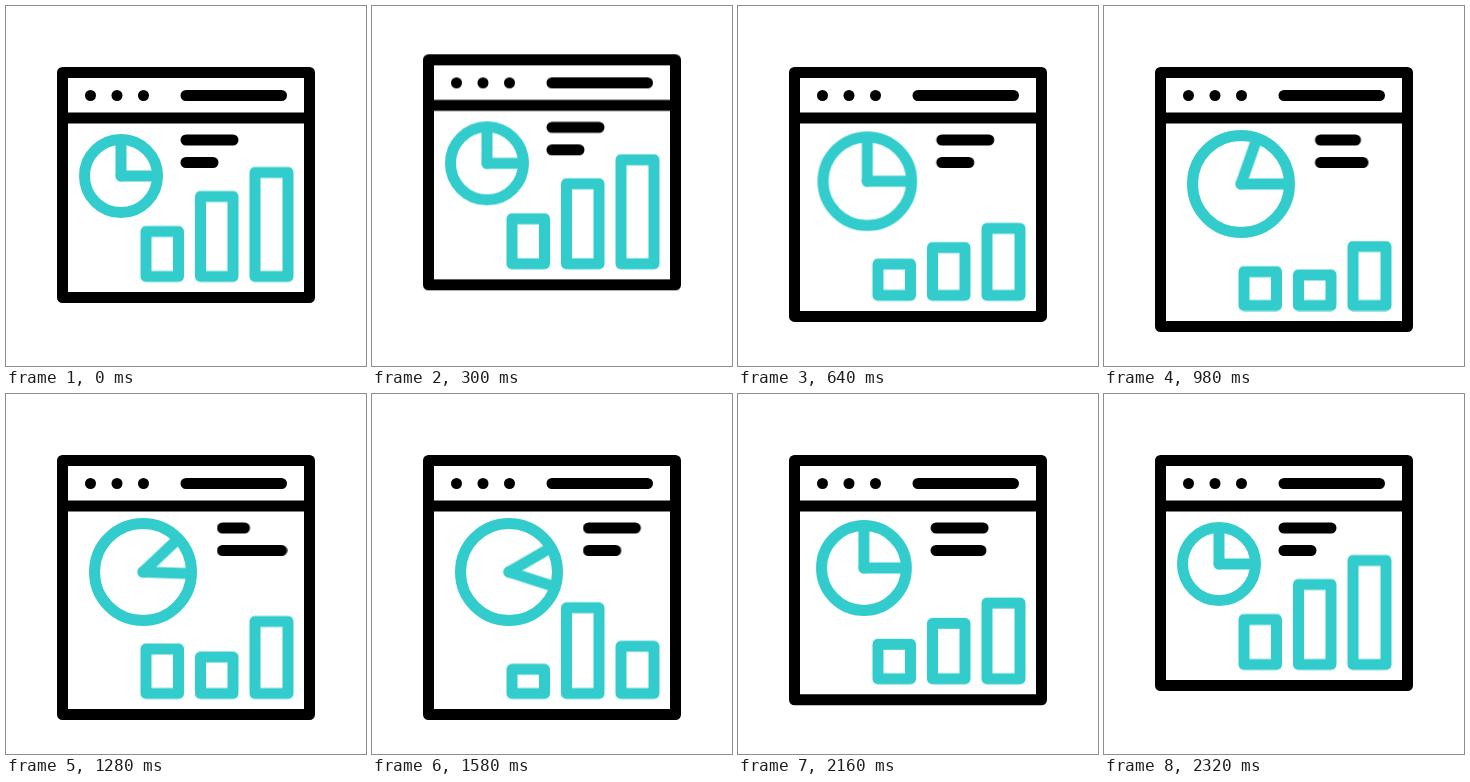
An HTML page without scripts that plays this animation: 360x360 px, repeating every 2.4 s.

```html
<!DOCTYPE html>
<html lang="en">
<head>
<meta charset="utf-8">
<title>Dashboard icon</title>
<style>
  html, body { margin: 0; width: 100%; height: 100%; overflow: hidden; background: #fff; }
  svg { display: block; width: 100vw; height: 100vh; }

  .ink { fill: #000; }
  .line { fill: none; stroke: #000; stroke-width: 11; stroke-linecap: round; stroke-linejoin: round; }
  .teal { fill: none; stroke: #3cc; stroke-width: 11; stroke-linejoin: round; }
  .hand { fill: #3cc; }

  .move { animation: 2400ms cubic-bezier(.33, 0, .67, 1) infinite; }

  /* 200 ms = 8.333%; the window is open from 33.333% to 83.333% */
  #window { animation-name: hop; }
  #frame  { height: 225px; animation-name: frame; }
  #bars   { animation-name: drop; }
  #text   { animation-name: slide; }
  #pie    { transform: translate(115px, 170px); animation-name: pie; }
  #ring   { r: 36.5px; animation-name: ring; }
  .hand   { width: 42px; animation-name: reach; }
  #from   { transform: rotate(-90deg); animation-name: from; }
  #to     { transform: rotate(0deg); animation-name: to; }
  #text1  { width: 58px; animation-name: text1; }
  #text2  { width: 38px; animation-name: text2; }
  #bar1   { height: 45px; animation-name: bar1; }
  #bar2   { height: 80px; animation-name: bar2; }
  #bar3   { height: 104px; animation-name: bar3; }

  @keyframes hop {
    0%, 8.333%, 25%, 100% { transform: translateY(0); }
    16.667% { transform: translateY(-25px); }
  }
  @keyframes frame {
    0%, 16.667%, 96.667%, 100% { height: 225px; }
    33.333%, 83.333% { height: 254px; }
  }
  @keyframes drop {
    0%, 16.667%, 96.667%, 100% { transform: translateY(0); }
    33.333%, 83.333% { transform: translateY(29px); }
  }
  @keyframes slide {
    0%, 16.667%, 96.667%, 100% { transform: translateX(0); }
    33.333%, 83.333% { transform: translateX(36.5px); }
  }
  @keyframes pie {
    0%, 16.667%, 96.667%, 100% { transform: translate(115px, 170px); }
    33.333%, 83.333% { transform: translate(137px, 178px); }
  }
  @keyframes ring {
    0%, 16.667%, 96.667%, 100% { r: 36.5px; }
    33.333%, 83.333% { r: 48.5px; }
  }
  @keyframes reach {
    0%, 16.667%, 96.667%, 100% { width: 42px; }
    33.333%, 83.333% { width: 54px; }
  }
  @keyframes from {
    0%, 33.333%, 83.333%, 100% { transform: rotate(-90deg); }
    50% { transform: rotate(-45deg); }
    66.667% { transform: rotate(-30deg); }
  }
  @keyframes to {
    0%, 50%, 83.333%, 100% { transform: rotate(0deg); }
    66.667% { transform: rotate(18deg); }
  }
  @keyframes text1 {
    0%, 33.333%, 66.667%, 100% { width: 58px; }
    50% { width: 30px; }
  }
  @keyframes text2 {
    0%, 33.333%, 66.667%, 96.667%, 100% { width: 38px; }
    50%, 83.333% { width: 74px; }
  }
  @keyframes bar1 {
    0%, 16.667%, 96.667%, 100% { height: 45px; }
    33.333%, 66.667%, 83.333% { height: 24px; }
    50% { height: 47px; }
  }
  @keyframes bar2 {
    0%, 16.667%, 96.667%, 100% { height: 80px; }
    33.333%, 50%, 83.333% { height: 30.5px; }
    66.667% { height: 86px; }
  }
  @keyframes bar3 {
    0%, 16.667%, 96.667%, 100% { height: 104px; }
    33.333%, 66.667%, 83.333% { height: 47px; }
    50% { height: 75px; }
  }
</style>
</head>
<body>
<svg viewBox="0 0 360 360">
  <g id="window" class="move">
    <rect id="frame" class="line move" x="56.5" y="66.5" width="247" height="225"/>
    <path class="line" d="M56.5 112H303.5M180 89.5H275.5"/>
    <g class="ink">
      <circle cx="84.5" cy="89.5" r="5.5"/>
      <circle cx="111" cy="89.5" r="5.5"/>
      <circle cx="137.5" cy="89.5" r="5.5"/>
    </g>

    <g id="text" class="ink move">
      <rect id="text1" class="move" x="174.5" y="128.5" width="58" height="11" rx="5.5"/>
      <rect id="text2" class="move" x="174.5" y="151" width="38" height="11" rx="5.5"/>
    </g>

    <g id="pie" class="move">
      <circle id="ring" class="teal move" r="36.5"/>
      <rect id="from" class="hand-turn move" width="0" height="0" visibility="hidden"/>
      <g id="from" class="move"><rect class="hand move" x="-5.5" y="-5.5" width="42" height="11" rx="5.5"/></g>
      <g id="to" class="move"><rect class="hand move" x="-5.5" y="-5.5" width="42" height="11" rx="5.5"/></g>
    </g>

    <g id="bars" class="move">
      <g class="teal" transform="translate(0 270.5) scale(1 -1)">
        <rect id="bar1" class="move" x="140" width="32.5" height="45"/>
        <rect id="bar2" class="move" x="194.5" width="32.5" height="80"/>
        <rect id="bar3" class="move" x="249" width="33" height="104"/>
      </g>
    </g>
  </g>
</svg>
</body>
</html>
```
